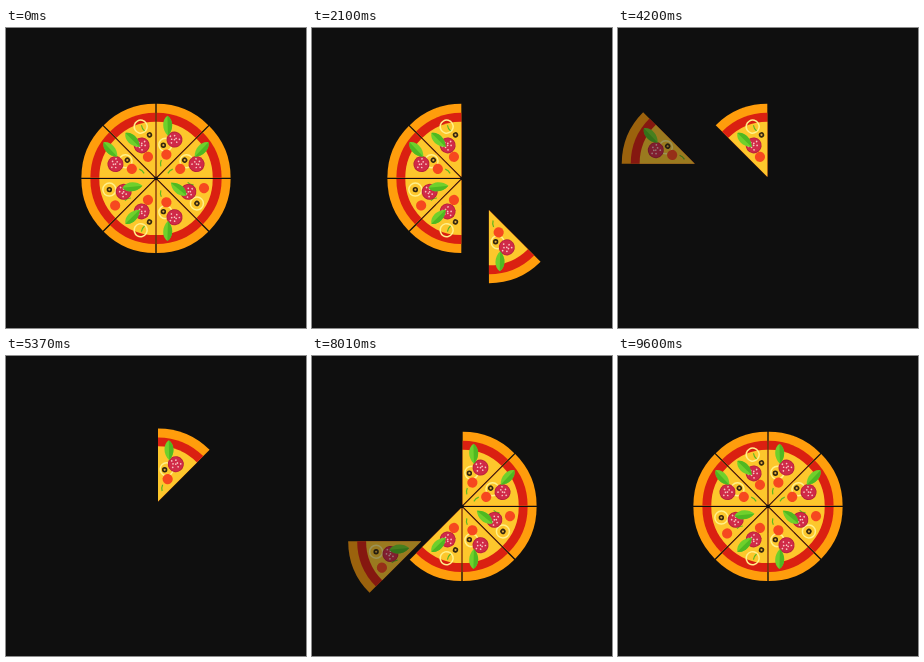
Animation of 300 by 300 pixels, one loop 9930 ms. Source, as an HTML page:

```html
<!DOCTYPE html>
<html lang="en">
<head>
<meta charset="utf-8">
<title>Pizza slices</title>
<style>
  html, body { margin: 0; width: 100%; height: 100%; overflow: hidden; background: #0f0f0f; }
  svg { display: block; width: 100vw; height: 100vh; }
</style>
</head>
<body>
<svg id="stage" viewBox="0 0 300 300"></svg>
<script>
const SLICES = 8, TURN = 360 / SLICES, MOVE = 600, FADE = 360, STEP = 30, LOOP = 9930;
const END = 2 * SLICES * MOVE;
const rad = degrees => degrees * Math.PI / 180;

// Toppings as [distance from the centre, degrees off the slice's middle line]
const outer = { onion: [35, 7], sprig: [16, 4], pepperoni: [43, -3], leaf: [54, 10], tomato: [26, -1], olive: [34, 10] };
const inner = { onion: [48, 9], sprig: [35, -14], pepperoni: [35, 0], leaf: [25, 3], tomato: [49, -11], olive: [48, 9] };
const edge = { onion: [54, -6], sprig: [52, -8], pepperoni: [36, 1], leaf: [45, 9], tomato: [23, -2], olive: [44, -14] };
const recipes = [outer, outer, inner, outer, edge, inner, outer, edge];
const mirrored = i => (i + 1) % SLICES < 3;

const dot = (r, fill, extra = '') => `<circle r="${r}" fill="${fill}" ${extra}/>`;

function specks() {
  let art = '';
  for (let k = 0; k < 8; k++) {
    art += `<g transform="rotate(${k * 137.5}) translate(${2 * Math.sqrt(k)})">${dot(0.85, '#f8c4c0')}</g>`;
  }
  return art;
}

const art = {
  onion: dot(6.5, 'none', 'stroke="#fff08a" stroke-width="1.5"'),
  sprig: '<path d="M-3.2 0Q0-1.2 3.2 0" fill="none" stroke="#5cb822" stroke-width="1.2"/>',
  pepperoni: dot(8, '#b51f3a') + dot(7.2, '#d02a48') + specks(),
  leaf: '<path d="M-10 0C-6-6 4-6 10 0C4 6-6 6-10 0Z" fill="#6fd02c"/>' +
    '<path d="M-10 0C-6 6 4 6 10 0Z" fill="#4fb822"/>',
  tomato: dot(5.1, '#f6481f'),
  olive: dot(1.9, '#e0a93a', 'stroke="#33270f" stroke-width="1.6"')
};

// Slice pointing straight up, its tip pushed off the centre to leave the cut
function sector(radius, fill) {
  const x = radius * Math.sin(rad(TURN / 2)), y = -1.75 - radius * Math.cos(rad(TURN / 2));
  return `<path d="M0-1.75L${-x} ${y}A${radius} ${radius} 0 0 1 ${x} ${y}Z" fill="${fill}"/>`;
}

const base = sector(73, '#ff9d0c') + sector(64, '#da2011') + sector(55.1, '#fdc72c');

function sliceArt(recipe, i) {
  const toppings = Object.entries(recipe).map(([name, [r, angle]]) =>
    `<g transform="rotate(${angle}) translate(0 ${-r}) rotate(104)">${art[name]}</g>`).join('');
  const flip = mirrored(i) ? -1 : 1;
  return `<g><g transform="translate(150 150.4) rotate(${(i + 0.5) * TURN}) scale(${flip} 1)">${base}${toppings}</g></g>`;
}

const stage = document.getElementById('stage');
stage.innerHTML = '<rect width="300" height="300" fill="#0f0f0f"/>' + recipes.map(sliceArt).join('');
const groups = stage.querySelectorAll(':scope > g');
const clamp = v => Math.max(0, Math.min(1, v));

// Corner slices fly a little farther; the heading swings slightly around the circle
function flight(i) {
  const heading = rad(i * TURN + 11 + 10 * Math.cos(rad(i * TURN)));
  const distance = i % 2 ? 80 : 73;
  return [distance * Math.sin(heading), -distance * Math.cos(heading)];
}

function draw(now) {
  const t = Math.min(END, Math.floor((now % LOOP) / STEP) * STEP);
  groups.forEach((group, i) => {
    const out = t - i * MOVE, back = out - END / 2;
    const away = back > 0 ? 1 - clamp(back / MOVE) : clamp(out / MOVE);
    const alpha = back > 0 ? clamp(back / FADE) : 1 - clamp((out - 450) / FADE);
    const [dx, dy] = flight(i);
    group.setAttribute('transform', `translate(${dx * away} ${dy * away})`);
    group.setAttribute('opacity', alpha);
  });
}

const start = performance.now();
(function tick() {
  draw(performance.now() - start);
  requestAnimationFrame(tick);
})();
</script>
</body>
</html>
```
